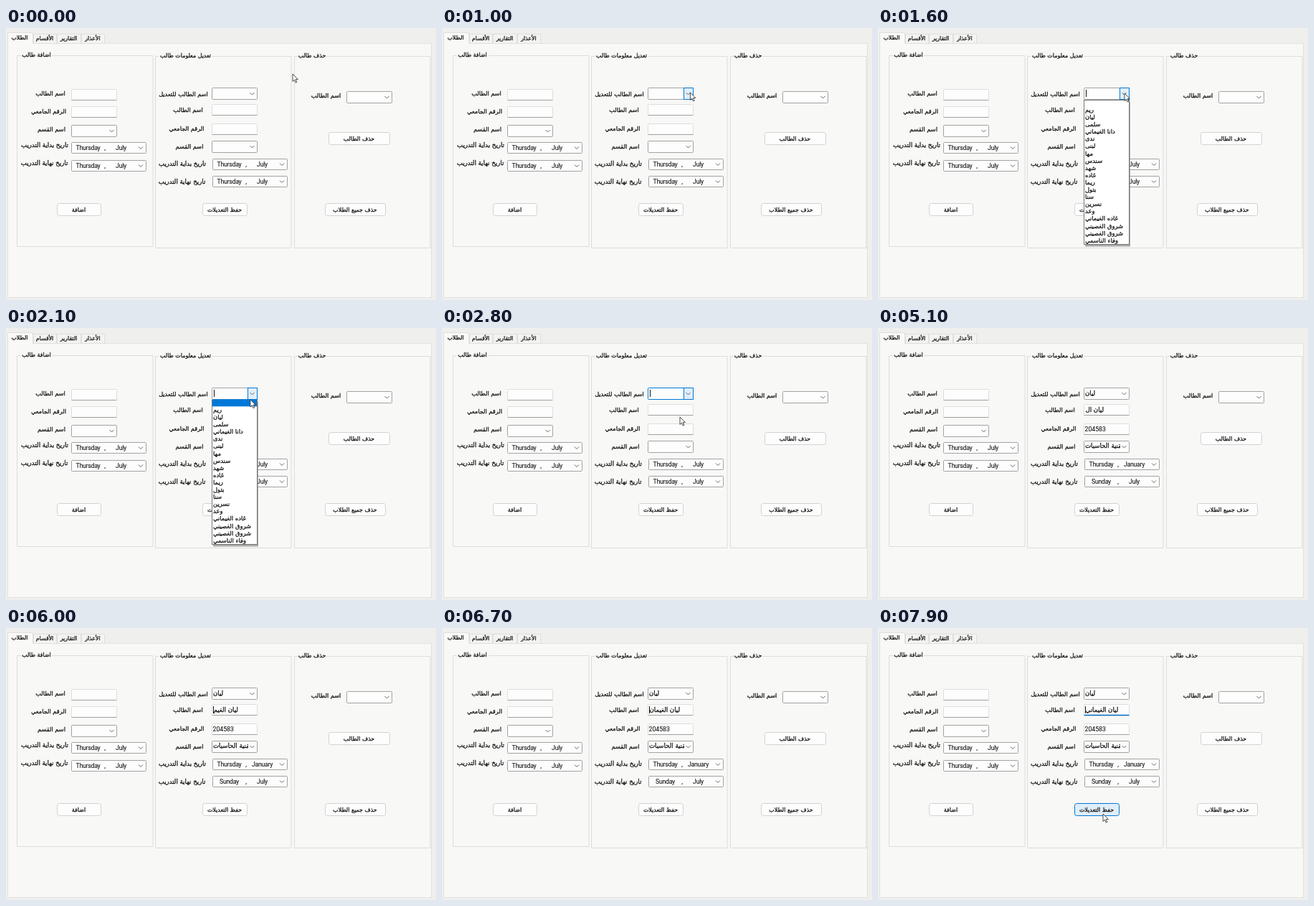
Recreate the animation shown at these times as an HTML page. Size 600 by 379 pixels, loop 8 s.

```html
<!DOCTYPE html>
<html lang="ar">
<head>
<meta charset="utf-8">
<title>نموذج الطلاب</title>
<style>
  html, body { margin: 0; width: 100%; height: 100%; overflow: hidden; background: #eff0ee; }
  svg { display: block; width: 100%; height: 100%; }
  text { font-family: 'DejaVu Sans', sans-serif; font-size: 8.2px; fill: #161616; stroke: #161616; stroke-width: .28; }
  .latin { font-family: Roboto, 'Liberation Sans', sans-serif; font-size: 8.7px; letter-spacing: -.25px; stroke-width: .1; }
  .num { letter-spacing: 0; }
  .mid { text-anchor: middle; }
  .group { fill: none; stroke: #dcdcdb; }
  .box { fill: #fdfdfd; stroke: #dededd; }
  .base { stroke: #a0a0a0; }
  .combo { fill: #fdfdfd; stroke: #a2a2a2; }
  .chev { fill: none; stroke: #555; stroke-width: .9; }
  .btn { fill: #fdfdfd; stroke: #d2d2d1; }
  .hot { fill: #e0eef9; stroke: #0078d4; }
  .sel { fill: #fff; stroke: none; }
</style>
</head>
<body>
<svg viewBox="0 0 600 379" preserveAspectRatio="none">
  <defs><clipPath id="clip"><rect x="288" y="156" width="50" height="18"/></clipPath></defs>
</svg>
<script>
const svg = document.querySelector('svg');

function add(tag, attrs, parent = svg) {
  const el = document.createElementNS('http://www.w3.org/2000/svg', tag);
  for (const k in attrs) el.setAttribute(k, attrs[k]);
  return parent.appendChild(el);
}
const rect = (x, y, w, h, cls, rx = 0, parent) =>
  add('rect', { x: x + .5, y: y + .5, width: w, height: h, class: cls, rx }, parent);
// y is the vertical middle of the line
function text(str, x, y, cls = 'mid', size, parent) {
  const el = add('text', { x, y: y + 2.6, class: cls }, parent);
  if (size) el.style.fontSize = size + 'px';
  el.textContent = str;
  return el;
}
const chevron = (x, y) => add('path', { d: `M${x - 3} ${y - 1.5}l3 3 3-3`, class: 'chev' });
const show = (el, on) => el.setAttribute('visibility', on ? 'visible' : 'hidden');

function field(x, y) {
  rect(x, y, 63, 15, 'box', 1);
  return add('path', { d: `M${x + .5} ${y + 15.5}h63`, class: 'base' });
}
function combo(x, y) {
  const el = rect(x, y, 63, 16, 'combo', 1);
  chevron(x + 56.5, y + 8.5);
  return el;
}
function date(x, y) {
  rect(x, y, 104, 15, 'combo', 1);
  chevron(x + 97, y + 8);
  const day = text('Thursday', x + 23.5, y + 8.5, 'latin mid');
  text(',', x + 47, y + 8.5, 'latin mid');
  const month = text('July', x + 69.5, y + 8.5, 'latin mid');
  return { day, month };
}
function button(str, x, y, w) {
  const el = rect(x, y, w, 17, 'btn', 3);
  text(str, x + w / 2, y + 9, 'mid', 7.9);
  return el;
}
function group(title, x, y, h, from, to) {
  add('path', { d: `M${from - 1.5} ${y + .5}H${x + .5}v${h}h189.5v${-h}H${to + 1.5}`, class: 'group' });
  text(title, (from + to) / 2, y - 1, 'mid', 7.9);
}

// Tabs and page
rect(2, 21, 591, 354, 'page').setAttribute('style', 'fill:#f8f8f6;stroke:#e2e2e1');
[['الأقسام', 38, 32], ['التقارير', 71, 33], ['الأعذار', 105, 32]].forEach(([s, x, w]) => {
  rect(x, 8, w, 13, 'tab').setAttribute('style', 'fill:#f3f3f2;stroke:#dfdfde');
  text(s, x + w / 2, 14, 'mid', 7.8);
});
add('path', { d: 'M2.5 22V6.5H37.5V22', style: 'fill:#f9f9f8;stroke:#dfdfde' });
text('الطلاب', 19, 13, 'mid', 7.8);

group('اضافة طالب', 15, 38, 266, 22, 63);
group('تعديل معلومات طالب', 208, 39, 267, 215, 286);
group('حذف طالب', 402, 39, 267, 409, 445);

const START = 'تاريخ بداية التدريب', END = 'تاريخ نهاية التدريب';
const NAME = 'اسم الطالب', NUMBER = 'الرقم الجامعي', DEPT = 'اسم القسم';
[
  [NAME, 62, 91], [NUMBER, 59.5, 116], [DEPT, 63.5, 141], [START, 54, 163, 8.6], [END, 53.5, 188, 8.6],
  ['اسم الطالب للتعديل', 247.5, 92], [NAME, 254, 114], [NUMBER, 252, 140], [DEPT, 256, 165],
  [START, 246, 189, 8.6], [END, 245.5, 214, 8.6], [NAME, 446.5, 94]
].forEach(([s, x, y, size]) => text(s, x, y, 'mid', size));

// Add form
field(91, 85);
field(91, 109);
combo(91, 135);
date(91, 159);
date(91, 184);
button('اضافة', 71, 244, 61);

// Delete form
combo(475, 88);
button('حذف الطالب', 450, 145, 85);
button('حذف جميع الطلاب', 445, 244, 84);

// Edit form
const pick = rect(287, 83, 63, 16, 'combo', 1);
const pickDrop = rect(337, 83, 13, 16, 'hot');
chevron(343.5, 91.5);
const nameLine = field(287, 106);
field(287, 133);
combo(287, 157);
const from = date(288, 182), to = date(288, 206);
const save = button('حفظ التعديلات', 274, 244, 62);

const FULL = 'ليان الغيماني';
const filled = add('g', {});
text('ليان', 289, 91, '', 8.6, filled);
const typed = text('', 289.5, 114, '', 8.6, filled);
text('204583', 288.5, 141.5, 'latin num', 0, filled);
const dept = add('g', { 'clip-path': 'url(#clip)' }, filled);
text('تقنية الحاسبات', 289, 164.5, '', 8.6, dept);
const caret = add('path', { style: 'stroke:#111;fill:none' });

// Drop-down list
const NAMES = ['', 'ريم', 'ليان', 'سلمى', 'دانا الغيماني', 'ندى', 'لبنى', 'مها', 'سندس', 'شهد', 'غاده',
  'ريما', 'بتول', 'سنا', 'نسرين', 'وعد', 'غاده الغيماني', 'شروق الغصيني', 'شروق الغصيني', 'وفاء الناسمي'];
const ROW = 10.1, TOP = 99.2;
const list = add('g', {});
add('rect', { x: 289, y: 103, width: 63, height: 201.5, fill: '#777', opacity: .6 }, list);
rect(287, 100, 63, 201, 'list', 0, list).setAttribute('style', 'fill:#fff;stroke:#777');
const mark = add('rect', { x: 288, width: 62, height: ROW, fill: '#0078d7' }, list);
const rows = NAMES.map((s, i) => text(s, 289, TOP + ROW * (i + .5), '', 8.4, list));

// Pointers
const arrow = add('path', { d: 'M0 0v10.5l2.4-2.3 1.7 3.9 1.7-.7-1.7-3.8h3.3z', fill: '#fff', stroke: '#222', 'stroke-width': .8 });
const beam = add('path', { d: 'M-3-5.5h2l1 1 1-1h2M0-4.5v9M-3 5.5h2l1-1 1 1h2', fill: 'none', stroke: '#111' });

const PATH = [[0, 400, 64], [300, 400, 64], [1100, 344, 91], [1900, 344, 91], [2500, 332, 124],
  [3000, 332, 124], [3600, 323, 114], [7200, 323, 114], [7700, 314, 259], [8000, 314, 259]];
const KEYS = [4100, 4300, 4500, 5400, 5700, 6000, 6300, 6600, 6800];
const LOOP = 8000, STEP = 100;

function pointer(t) {
  const i = PATH.findIndex(p => p[0] > t);
  const [t0, x0, y0] = PATH[i - 1], [t1, x1, y1] = PATH[i];
  const p = (t - t0) / (t1 - t0), e = p * p * (3 - 2 * p);
  return [x0 + (x1 - x0) * e, y0 + (y1 - y0) * e];
}

function draw(t) {
  const [x, y] = pointer(t);
  const open = t >= 1300 && t < 2800, loaded = t >= 3000;
  const hot = t >= 1000 && !loaded;
  const hidden = t >= KEYS[0] && t <= 7200;
  const inName = loaded && x > 287 && x < 350 && y > 106 && y < 122;

  pick.style.stroke = hot && t >= 2800 ? '#0078d4' : '';
  show(pickDrop, hot);
  show(list, open);
  const row = Math.floor((y - TOP) / ROW);
  show(mark, open && row >= 0);
  mark.setAttribute('y', TOP + ROW * row);
  rows.forEach((el, i) => el.setAttribute('class', i === row ? 'sel' : ''));

  show(filled, loaded);
  from.month.textContent = loaded ? 'January' : 'July';
  to.day.textContent = loaded ? 'Sunday' : 'Thursday';
  const count = KEYS.filter(k => k <= t).length;
  typed.textContent = FULL.slice(0, 4 + count);

  const inCombo = t >= 1300 && !loaded, editing = t >= 3700;
  const since = count ? t - KEYS[count - 1] : editing ? t - 3700 : 0;
  show(caret, inCombo || editing && since % 1060 < 530);
  caret.setAttribute('d', inCombo ? 'M290.5 86v10' : 'M289.5 109v10');

  const blue = t >= 7300;
  nameLine.setAttribute('style', blue ? 'stroke:#0067c0;stroke-width:1.6' : '');
  save.setAttribute('class', y > 244 ? 'hot' : 'btn');

  show(arrow, !hidden && !inName);
  show(beam, !hidden && inName);
  for (const el of [arrow, beam]) el.setAttribute('transform', `translate(${x} ${y})`);
}

const begin = performance.now();
function tick() {
  const t = (performance.now() - begin) % LOOP;
  draw(Math.floor(t / STEP) * STEP);
  requestAnimationFrame(tick);
}
tick();
</script>
</body>
</html>
```
